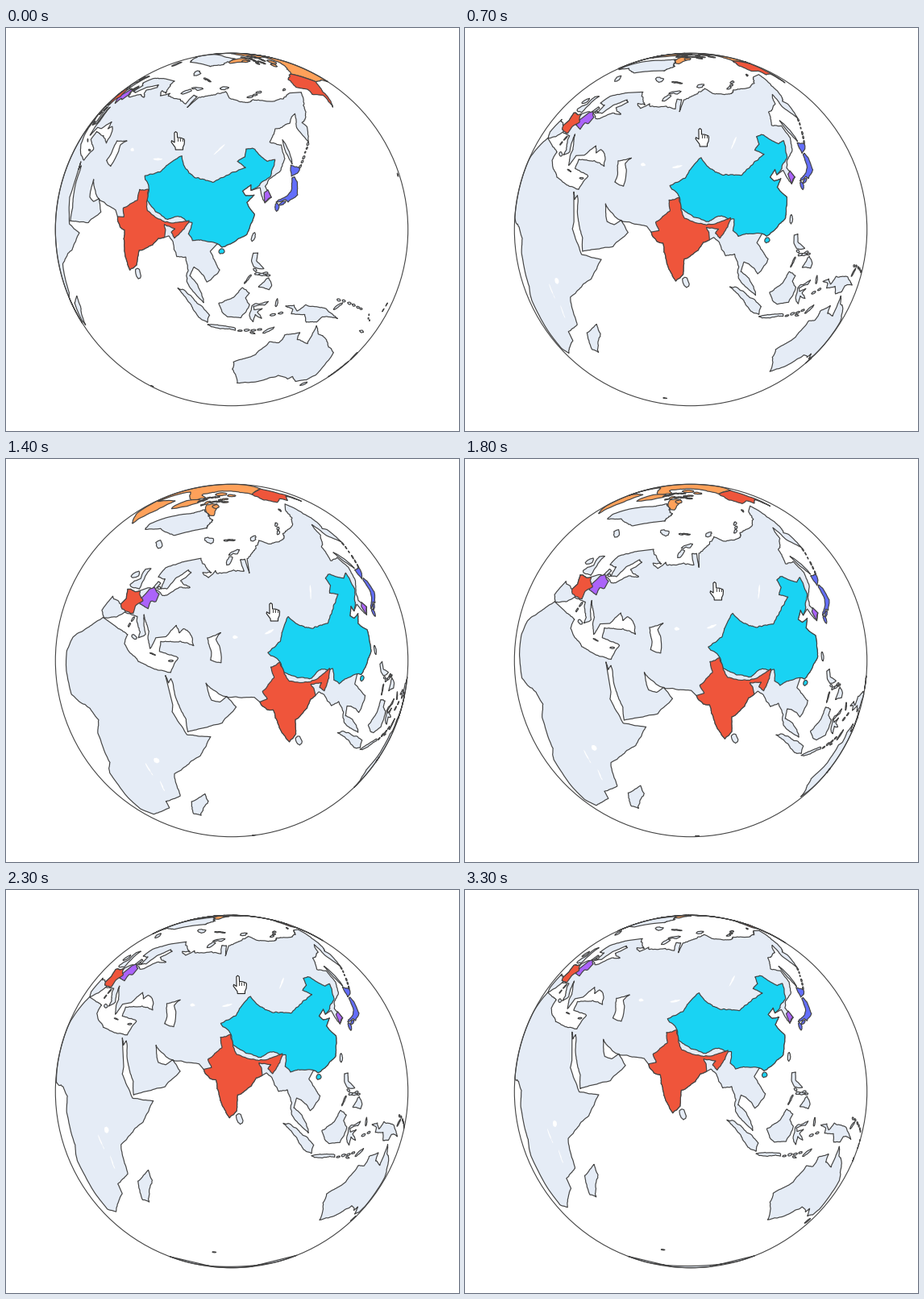
A matplotlib script for the animation above (3.9 s loop, 562 by 500 pixels).

```python
import numpy as np
import matplotlib.pyplot as plt
from matplotlib.animation import FuncAnimation
from matplotlib.patches import Circle, Polygon

W, H = 562, 500
CX, CY, R = 280, 250, 218.7
FRAMES, STEP = 39, 100
INK, LAND, SEA = "#444444", "#E5ECF6", "white"
RED, CYAN, BLUE = "#EF553B", "#19D3F3", "#636EFA"
PURPLE, ORANGE = "#AB63FA", "#FFA15A"

rng = np.random.default_rng(7)
fig = plt.figure(figsize=(W / 100, H / 100), dpi=100, facecolor="white")
ax = fig.add_axes([0, 0, 1, 1])
ax.set(xlim=(0, W), ylim=(H, 0))
ax.axis("off")

shapes = []


def rough(*flat, amp=0.05, levels=4):
    """Fractal coast through a few lon/lat points, as lon + i*lat."""
    p = np.array(flat[::2]) + 1j * np.array(flat[1::2])
    for _ in range(levels):
        edge = np.diff(p)
        size = np.minimum(1, 5 / np.maximum(abs(edge), 1e-9))
        mid = (p[:-1] + p[1:]) / 2 + 1j * edge * size * rng.normal(0, amp, len(edge))
        out = np.empty(2 * len(p) - 1, complex)
        out[::2], out[1::2] = p, mid
        p = out
    return p


def area(color, *arcs, edge=INK):
    p = np.concatenate(arcs)
    lon, lat = np.radians(p.real), np.radians(p.imag)
    xyz = np.cos(lat) * np.sin(lon), np.sin(lat), np.cos(lat) * np.cos(lon)
    patch = Polygon([(0, 0), (1, 1)], closed=True, fc=color, ec=edge, lw=0.85,
                    joinstyle="round", zorder=2 + 0.001 * len(shapes))
    ax.add_patch(patch)
    shapes.append((patch, xyz))


def loop(color, *flat):
    area(color, rough(*flat, *flat[:2]))


def isle(lon, lat, a, b, tilt=0, color=LAND, edge=INK):
    """Rough ellipse with half-axes a, b in degrees of arc."""
    u = np.linspace(0, 2 * np.pi, 9)
    r = rng.uniform(0.8, 1.15, 9)
    r[-1] = r[0]
    p = r * (a * np.cos(u) + 1j * b * np.sin(u)) * np.exp(1j * np.radians(tilt))
    x, y = lon + p.real / np.cos(np.radians(lat)), lat + p.imag
    area(color, rough(*np.column_stack([x, y]).ravel(), levels=1), edge=edge)


def chain(lon0, lat0, lon1, lat1, n, size, color=LAND, jitter=0.3):
    """Row of small islands stretched along a line."""
    tilt = np.degrees(np.arctan2(lat1 - lat0, lon1 - lon0))
    for u in np.linspace(0, 1, n):
        dx, dy = rng.normal(0, jitter, 2)
        s = size * rng.uniform(0.7, 1.3)
        isle(lon0 + (lon1 - lon0) * u + dx, lat0 + (lat1 - lat0) * u + dy, s, s * 0.4, tilt, color)


# Coast of the Old World, clockwise from the North Cape
arctic = rough(25.8, 71.1, 41, 67, 34, 66.3, 40, 65, 44, 68, 46, 67, 60, 68.7, 69, 68, 67.5, 72.5,
               72.6, 72.5, 73, 67, 75, 72.5, 87, 75, 104, 77.7, 113, 74, 128, 72, 140, 72.3,
               160, 69.5, 180, 69)
pacific = rough(190, 66.1, 178, 63, 170, 60, 162, 58, 163, 56, 157, 51, 156, 57, 163, 62,
                154, 59.6, 142, 59.2, 135.2, 54.8, 141, 53, 140, 48, 135.5, 44, 129.7, 42,
                127.5, 39.8, 129.3, 36, 126.4, 34.5, 125.2, 39.6)
china = rough(121.3, 38.9, 121.5, 40.8, 117.7, 38.8, 119, 37.2, 122.4, 37.3, 119.2, 35, 121.9, 31,
              118.5, 24.5, 114.2, 22.3, 109.8, 20.5, 108.2, 21.6)
indochina = rough(105.8, 19, 109.2, 13, 105, 8.7, 102.5, 12.1, 100.5, 13.4, 99.2, 10.3, 103.4, 4.5,
                  104, 1.4, 100.5, 5, 98.3, 8.2, 98.6, 12, 97.4, 16.4, 94.3, 16.1, 92.3, 20.8,
                  90.5, 22.4)
india = rough(89, 21.7, 86.8, 21, 82.4, 16.7, 80.2, 15.6, 79.9, 10.4, 77.5, 8.1, 74.8, 12.9,
              72.7, 20.5, 70.5, 20.9, 69.1, 22.2, 68.2, 23.7)
arabia = rough(66.4, 25.4, 57.3, 25.7, 51.5, 27.9, 48.5, 30, 51, 24.5, 54, 24.1, 56.3, 26,
               59.8, 22.5, 55, 17, 43.4, 12.7, 42.5, 17, 39, 21.9, 34.9, 29.4, 34.3, 27.8,
               32.5, 29.9, amp=0.03)
africa = rough(37.2, 21, 37.3, 18.6, 43.2, 11.6, 51.2, 11.9, 48, 4.5, 39.2, -4.7, 40.6, -15,
               34.8, -20, 35.5, -23.8, 32.5, -27, 26, -34, 19, -34.7, 14.5, -23, 11.8, -17,
               13.5, -11, 8.8, -1, 9, 4.5, 4.3, 6.3, -7.5, 4.3, -15, 11, -17.3, 15, -16.5, 21,
               -9.8, 30, -5.9, 35.8, amp=0.03)
levant = rough(3, 36.8, 10.5, 37.1, 11, 34, 15.2, 32.3, 20, 31, 31, 31.2, 34.3, 31.3, 36, 36.5,
               27.4, 36.8, 26.5, 40, 35, 42, 41.5, 41.5, 38, 45.5, 35, 46.2, 33.6, 44.5,
               31, 46.6, 28, 42)
europe = rough(23.7, 40.5, 23, 36.5, 19.4, 41.5, 13, 45.5, 18.5, 40.2, 16, 38, 15.5, 40, 10.3, 43.8,
               6.2, 43.1, 3.1, 42.5, -0.2, 39, -5.5, 36, -9, 37, -9, 43, -1.7, 43.4)
channel = rough(-1.2, 46, -4.6, 48.4, -1.6, 49.3, 1.5, 50.1)
baltic = rough(5, 53, 8.3, 54, 8.3, 57, 10.5, 57, 10, 54.3, 18.7, 54.6, 21.5, 57.5, 24, 59, 30, 60,
               21.5, 61, 25.3, 65, 22, 65.5, 17.2, 61, 16.5, 56.5, 13, 55.5, 11, 59, 6, 58.2,
               5, 62, 14, 67.5)
area(LAND, arctic, pacific, china, indochina, india, arabia, africa, levant, europe, channel, baltic)
loop(SEA, 47, 44.7, 53, 46.8, 51, 44.5, 53.5, 40.5, 53.9, 37, 49.5, 37.6, 49.5, 40.3)

# Inland lakes: three African, then Balkhash, Aral and Baikal
isle(33, -1, 1.3, 1.2, edge="none")
isle(30.2, -6, 2.7, 0.3, -60, edge="none", color=SEA)
isle(34.5, -12, 2.4, 0.3, -75, edge="none", color=SEA)
isle(33, -1, 1.1, 1.1, edge="none", color=SEA)
isle(76.3, 46, 1.8, 0.4, 15, edge="none", color=SEA)
isle(59.7, 45.4, 0.9, 0.6, edge="none", color=SEA)
isle(107, 53.5, 2.8, 0.3, 50, edge="none", color=SEA)

# Highlighted mainland countries
area(CYAN, china,
     rough(106.7, 22, 102.2, 22.5, 99.3, 22, 97.6, 24, 98.5, 27.8, 94, 29.2, 89, 27.6, 82, 30.2,
           78.8, 32, 78, 35.5, 73.6, 39.4, 80, 42.1, 82.5, 45.4, 87.6, 49.2, 91, 45.5, 96.4, 42.7,
           105, 41.6, 111.5, 44.3, 119.8, 46.7, 116, 49, 120, 50.5, 121, 53.3, 125.8, 53,
           130.8, 48.2, 134.9, 48.4, 131, 43.2, 124.3, 39.9))
isle(109.8, 19.2, 1, 0.8, 20, CYAN)
area(RED, india,
     rough(71, 24.4, 69.5, 27, 74.5, 31, 73.8, 34.6, 77.8, 35.5, 78.7, 31.5, 80.1, 28.8, 88.1, 26.6,
           92, 27, 97.3, 28.3, 94.5, 24, 92.7, 22, 91.2, 23.8, 92.4, 25, 89.6, 25.5, 88.1, 25.8,
           88.9, 24.2))
loop(PURPLE, 126.7, 37.8, 128.4, 38.6, 129.4, 36, 126.4, 34.4)
loop(PURPLE, 8.9, 54.8, 14.1, 53.8, 15, 51.1, 12.2, 50.3, 13.3, 47.8, 7.6, 47.6, 6.2, 49.5, 7, 53.5)
area(RED, rough(2.5, 51, 8.1, 49, 6.1, 46.3, 7.5, 43.8, 3.1, 42.7, -1.8, 43.4), channel)

# Japan
loop(BLUE, 130.9, 34.2, 136, 35.7, 138.5, 37.4, 140.3, 41.2, 141.5, 41.3, 142, 39.5, 140.5, 35.3,
     135.8, 33.6, 135, 34.6)
isle(130.9, 32.5, 1.4, 0.8, 75, BLUE)
isle(133.4, 33.6, 1.2, 0.5, 20, BLUE)
loop(BLUE, 140.2, 41.7, 141.7, 45.4, 145.4, 43.6, 143.2, 42.2)

# North America and its arctic islands
loop(ORANGE, -141, 69.6, -115, 68, -95, 68, -94, 71.8, -82, 69.5, -94, 60, -80, 51.3, -78, 62.4,
     -65, 59, -56, 52, -70, 47, -95, 49, -123, 49, -130.5, 55, -141, 60.3)
loop(RED, -141, 60.3, -141, 69.6, -156.5, 71.3, -166, 68.3, -161, 64.5, -165, 62.5, -158, 58.8,
     -165, 54.6, -153, 59)
for lon, lat, a, b, tilt in ((-111, 71, 2.2, 1.6, 0), (-76, 69, 6, 2.2, -42), (-122, 73, 1.4, 1, 0),
                             (-78, 80, 4.5, 1.9, 50), (-87, 75.3, 2, 0.6, 0), (-111, 75.7, 1.6, 0.7, 0),
                             (-92, 79.5, 1.4, 1, 60)):
    isle(lon, lat, a, b, tilt, ORANGE)
chain(-105, 73, -86, 72, 5, 1.1, ORANGE)
chain(-112, 78, -95, 76, 6, 0.9, ORANGE)
isle(204.5, 19.6, 0.6, 0.5, color=RED)
loop(LAND, -73, 78.3, -60, 76, -54, 70, -48, 61, -43, 60, -38, 66, -22, 70.5, -18, 77, -12, 81.5,
     -33, 83.6, -62, 81.5)

# Northern and Mediterranean islands
isle(-19, 65, 2.1, 1.1)
loop(LAND, -5.5, 50, 1.4, 51.2, -2, 55.8, -3.2, 58.6, -6, 57, -3, 54, -5, 52)
isle(-8, 53.4, 1.6, 1.2, 60)
isle(18, 78.5, 1.8, 1.2)
isle(55.5, 72.3, 2, 0.8, 70)
isle(61.5, 75.5, 2.3, 0.6, 30)
isle(100, 79.4, 1.5, 0.8, 20)
chain(137, 74.5, 150, 75, 3, 1, jitter=0.5)
chain(47, 80.6, 62, 80.8, 4, 0.7)
isle(180.5, 71.2, 0.8, 0.3)
isle(142.8, 50, 4.2, 0.6, 88)
chain(146, 44.2, 156, 50.5, 6, 0.6, jitter=0.1)
chain(8.9, 40, 9, 42.2, 2, 1, jitter=0)
isle(14, 37.5, 1.2, 0.6, -10)
isle(24.9, 35.2, 1, 0.15)
isle(33.3, 35, 0.8, 0.3, 20)
isle(11.7, 55.5, 0.6, 0.5)

# South-east Asia
isle(121, 23.8, 1.5, 0.6, 70)
isle(80.7, 7.7, 1.8, 1, -80)
loop(LAND, 95.3, 5.6, 97.5, 5.2, 103.6, 0, 106, -3, 105.3, -5.8, 102.3, -4, 98.6, 1.8)
loop(LAND, 105.3, -6.6, 108.5, -6.5, 114.4, -7.8, 114.4, -8.6, 106.5, -7.4)
loop(LAND, 109, 1.5, 113, 3.2, 116.7, 7, 119, 5, 117.7, 3.4, 119, 1, 116.2, -3.8, 111.8, -3.4, 110, -1.5)
loop(LAND, 119.8, 0.5, 121, 1.2, 125.2, 1.6, 124, 0.4, 120.3, 0.2, 120.5, -1, 123.2, -0.8,
     121.6, -2, 123, -4.4, 120.9, -2.8, 120.2, -5.5, 119, -2.7)
isle(128, 0.8, 1.4, 0.4, 80)
chain(126.6, -3.4, 129.5, -3.2, 2, 1, jitter=0.1)
isle(125.3, -9.3, 2.1, 0.5, 28)
chain(116, -8.6, 122.5, -8.5, 4, 0.9, jitter=0.15)
isle(120, -9.8, 0.9, 0.3, -25)
loop(LAND, 120.6, 18.4, 122.2, 18.4, 121.6, 15.8, 124, 13, 120.6, 13.9, 119.9, 16)
loop(LAND, 122, 7, 125.5, 9.8, 126.4, 7, 125.5, 5.7)
chain(122, 11.3, 125.2, 11, 4, 0.9)
isle(118.5, 9.8, 2, 0.3, 52)
isle(121, 12.8, 0.7, 0.4, -40)

# Oceania and the southern ocean
loop(LAND, 131, -0.8, 134, -1, 135, -3.3, 138, -1.6, 145.8, -5, 150.8, -10.3, 144.5, -7.7,
     142.5, -9.2, 138.5, -8.3, 137.8, -5.2, 133, -4, 133.5, -2.4)
isle(150.4, -5.4, 2, 0.5, 20)
chain(151, -2.8, 161.5, -10.3, 6, 0.8, jitter=0.2)
isle(165.5, -21.3, 1.8, 0.4, -35)
chain(166.8, -15, 168.5, -18, 3, 0.5)
chain(177.8, -17.8, 179.5, -16.7, 2, 0.6, jitter=0.1)
isle(69.5, -49.3, 0.6, 0.3)
loop(LAND, 142.5, -10.7, 143.6, -14.3, 145.8, -16, 149.5, -22, 153.2, -26, 150, -37.4, 146.3, -39,
     140.5, -38, 137.7, -33.8, 135.9, -34.9, 131.2, -31.5, 123.6, -33.9, 115.3, -34.3, 113.4, -26,
     113.8, -22.4, 121.5, -19.2, 126, -14, 129.3, -14.9, 131, -12, 136.5, -12, 135.8, -14.8,
     140, -17.6)
isle(146.5, -42, 1.5, 1.2)
isle(170.5, -43.7, 4, 1.2, 48)
isle(176, -38.5, 3, 1.2, -60)
loop(LAND, 49.3, -12, 50.3, -15.7, 47.2, -24.9, 44.5, -24.5, 44.4, -17)
lon = np.arange(0, 171, 3)
area(LAND, lon + 1j * (-68 + 1.6 * np.sin(np.radians(2 * lon - 110))), rough(170, -84, 0, -84))

ax.add_patch(Circle((CX, CY), R, fc="none", ec=INK, lw=0.8, zorder=5))

# Pointing hand, relative to its fingertip
hand = np.array([(-1.6, 0), (0, -1.4), (1.8, 0), (2.1, 6), (6, 6.2), (10.4, 7.8), (11, 9.5),
                 (10.6, 14.5), (9, 18), (9, 21), (-0.2, 21), (-0.5, 18.2), (-5.4, 11.6),
                 (-5, 9.7), (-1.4, 12)])
cursor = Polygon(hand, closed=True, fc="white", ec="#222222", lw=0.8, joinstyle="round", zorder=6)
ax.add_patch(cursor)
knuckles = [ax.plot([], [], color="#222222", lw=0.6, zorder=7)[0] for _ in range(3)]

# Time, centre longitude and latitude, cursor x and y
KEYS = np.array([(0, 113.2, 26.3, 210.5, 130), (700, 82.4, 25.2, 291.5, 126),
                 (1400, 58.2, 37.8, 328.5, 180), (1800, 66.2, 35.2, 309.5, 154),
                 (2100, 73, 19, 298.5, 113), (2600, 83.4, 15.2, 275.5, 104)])
CURSOR_END = 3200


def slopes(t, v):
    """Tangents that never overshoot a key."""
    d = np.diff(v) / np.diff(t)
    m = np.zeros_like(v)
    for k in range(1, len(v) - 1):
        if d[k - 1] * d[k] > 0:
            m[k] = 2 * d[k - 1] * d[k] / (d[k - 1] + d[k])
    return m


TIMES = KEYS[:, 0]
SLOPES = np.array([slopes(TIMES, v) for v in KEYS[:, 1:].T]).T


def pose(t):
    t = min(t, TIMES[-1])
    k = min(np.searchsorted(TIMES, t, side="right") - 1, len(TIMES) - 2)
    h = TIMES[k + 1] - TIMES[k]
    u = (t - TIMES[k]) / h
    a, b = KEYS[k, 1:], KEYS[k + 1, 1:]
    ease = u * u * (3 - 2 * u)
    return (a + (b - a) * ease + h * SLOPES[k] * u * (1 - u) ** 2
            - h * SLOPES[k + 1] * u * u * (1 - u))


def project(p, lon, lat):
    """Orthographic view; hidden points slide out to the rim."""
    x, y, z = p
    a, b = np.radians((lon, lat))
    east = x * np.cos(a) - z * np.sin(a)
    depth = x * np.sin(a) + z * np.cos(a)
    north = y * np.cos(b) - depth * np.sin(b)
    front = y * np.sin(b) + depth * np.cos(b)
    scale = np.where(front < 0, R / np.maximum(np.hypot(east, north), 1e-6), R)
    return np.column_stack([CX + east * scale, CY - north * scale]), (front > 0).any()


def update(i):
    t = i * STEP
    lon, lat, x, y = pose(t)
    for patch, p in shapes:
        xy, seen = project(p, lon, lat)
        patch.set_visible(bool(seen))
        if seen:
            patch.set_xy(xy)
    on = t < CURSOR_END
    cursor.set_visible(on)
    cursor.set_xy(hand + (x, y))
    for k, line in enumerate(knuckles):
        line.set_visible(on)
        line.set_data([x + 2 + 3 * k] * 2, [y + 6.5 + k * 0.5, y + 10])
    return []


anim = FuncAnimation(fig, update, frames=FRAMES, interval=STEP, repeat=True, repeat_delay=0, blit=False)
plt.show()
```
